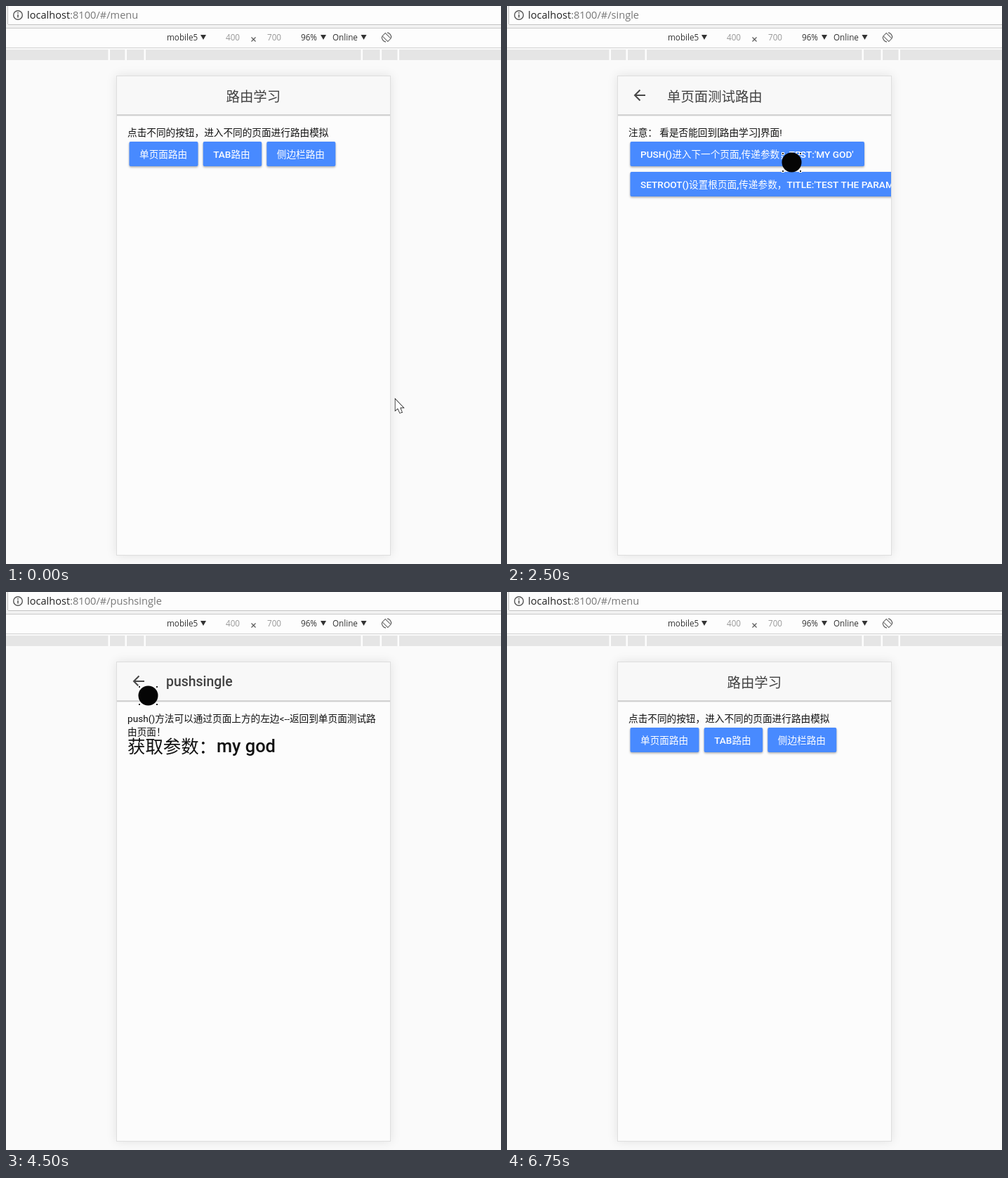
Recreate the animation shown at these times as an HTML page with a canvas. Size 705 px wide and 794 px high, loop 7.25 s.

```html
<!DOCTYPE html>
<html lang="zh-CN">
<head>
<meta charset="utf-8">
<title>路由学习</title>
<style>
html, body { margin: 0; width: 100%; height: 100%; overflow: hidden; background: #fafafa; }
canvas { display: block; }
</style>
</head>
<body>
<canvas id="stage" width="705" height="794"></canvas>
<script>
const W = 705, H = 794, STEP = 250, LOOP = 7250;
const stage = document.getElementById('stage').getContext('2d');
const APP = { x: 157, y: 99, w: 391, h: 683 };
const APP_FONT = 'Roboto, "Noto Sans CJK SC", "Noto Sans CJK", sans-serif';
const UI_FONT = '"Open Sans", "Noto Sans", sans-serif';
const BODY = 13.65, TITLE = 19.4, HEADING = 25.4;

// Touch position at each step, beginning at 250 ms
const touches = [
  [325, 380], [270, 292], [240, 245], [230, 230], [228, 227],
  [230, 232], [343, 493], [331, 390], [372, 268], [405, 222],
  [407, 225], [407, 225], [385, 262], [298, 298], [254, 267],
  [190, 152], [200, 147], [202, 147], [203, 149], [268, 415],
  [292, 300], [225, 180], [212, 149], [212, 147], [228, 163], [513, 441]
];

// Each scene: start time, address, page, and an optional page fading above it
const scenes = [
  { at: 0, path: 'menu', page: 'menu' },
  { at: 1500, path: 'menu', page: 'menu', over: 'single', alpha: 0.9, shift: 4 },
  { at: 1750, path: 'single', page: 'single' },
  { at: 3000, path: 'single', page: 'push', shift: 1 },
  { at: 3250, path: 'pushsingle', page: 'push' },
  { at: 4750, path: 'pushsingle', page: 'single', over: 'push', alpha: 0.35, shift: 25 },
  { at: 5000, path: 'single', page: 'single' },
  { at: 6000, path: 'single', page: 'menu', over: 'single', alpha: 0.35, shift: 25 },
  { at: 6250, path: 'menu', page: 'menu' }
];

function rect(c, x, y, w, h, color) {
  c.fillStyle = color;
  c.fillRect(x, y, w, h);
}

function text(c, str, x, y, size, color, weight = 400, family = APP_FONT) {
  c.font = `${weight} ${size}px ${family}`;
  c.fillStyle = color;
  c.fillText(str, x, y);
  return x + c.measureText(str).width;
}

function polyline(c, points, color, width, closed) {
  c.beginPath();
  points.forEach(([x, y]) => c.lineTo(x, y));
  if (closed) c.closePath();
  c.strokeStyle = color;
  c.lineWidth = width;
  c.stroke();
}

function button(c, label, x, y, w) {
  c.save();
  c.shadowColor = 'rgba(0,0,0,.32)';
  c.shadowBlur = 3;
  c.shadowOffsetY = 1.5;
  c.fillStyle = '#488aff';
  c.beginPath();
  c.roundRect(x, y, w, 35, 2);
  c.fill();
  c.restore();
  text(c, label, x + 14.5, y + 22.5, BODY, '#fff', 500);
}

function header(c) {
  rect(c, APP.x, APP.y, APP.w, 56, '#f8f8f8');
  rect(c, APP.x, 154, APP.w, 1, '#d6d6d6');
  rect(c, APP.x, 155, APP.w, 1, '#cfcfcf');
  rect(c, APP.x, 156, APP.w, 1, '#ececec');
}

function backArrow(c) {
  polyline(c, [[197, 127], [182.5, 127]], '#484848', 2);
  polyline(c, [[189.5, 119.5], [182, 127], [189.5, 134.5]], '#484848', 2);
}

const painters = {
  menu(c) {
    text(c, '路由学习', 313.5, 135.5, TITLE, '#424242');
    text(c, '点击不同的按钮，进入不同的页面进行路由模拟', 173, 185, BODY, '#111');
    button(c, '单页面路由', 175.5, 193, 98);
    button(c, 'TAB路由', 280.7, 193, 83.5);
    button(c, '侧边栏路由', 371.3, 193, 98);
  },
  single(c) {
    backArrow(c);
    text(c, '单页面测试路由', 228, 135.5, TITLE, '#424242');
    text(c, '注意： 看是否能回到[路由学习]界面!', 173, 185, BODY, '#111');
    button(c, "PUSH()进入下一个页面,传递参数，TEST:'MY GOD'", 175.5, 193, 333.5);
    button(c, "SETROOT()设置根页面,传递参数，TITLE:'TEST THE PARAMS'", 175.5, 236, 400);
  },
  push(c) {
    backArrow(c);
    text(c, 'pushsingle', 228, 134, TITLE, '#424242', 500);
    text(c, 'push()方法可以通过页面上方的左边<--返回到单页面测试路', 173, 185, BODY, '#111');
    text(c, '由页面！', 173, 203.5, BODY, '#111');
    const x = text(c, '获取参数：', 173, 228.5, HEADING, '#111', 300);
    text(c, 'my god', x, 228, HEADING, '#111', 500);
  }
};

function layer(paint) {
  const canvas = document.createElement('canvas');
  canvas.width = W;
  canvas.height = H;
  paint(canvas.getContext('2d'));
  return canvas;
}

const pages = {};
for (const name in painters) {
  pages[name] = layer(c => {
    rect(c, APP.x, APP.y, APP.w, APP.h, '#fcfcfc');
    header(c);
    painters[name](c);
  });
}

function triangle(c, x) {
  c.fillStyle = '#333';
  c.beginPath();
  c.moveTo(x, 41);
  c.lineTo(x + 8, 41);
  c.lineTo(x + 4, 48);
  c.fill();
}

function rotateIcon(c) {
  c.save();
  c.translate(542, 44.5);
  c.rotate(-Math.PI / 4);
  c.strokeStyle = '#666';
  c.lineWidth = 1;
  c.strokeRect(-3, -5.5, 6, 11);
  c.restore();
  for (const start of [-0.45, 0.55]) {
    c.beginPath();
    c.arc(542, 44.5, 6.7, start * Math.PI, (start + 0.5) * Math.PI);
    c.stroke();
  }
}

const chrome = layer(c => {
  rect(c, 0, 0, W, H, '#fafafa');
  rect(c, 0, 0, W, 31, '#f2f2f2');
  rect(c, 3, 0, W, 26, '#fdfdfd');
  rect(c, 2, 0, 1, 26, '#c4c4c4');
  rect(c, 3, 26, W, 1, '#c4c4c4');
  rect(c, 0, 31, W, 1, '#c9c9c9');
  rect(c, 0, 32, W, 27, '#fdfdfd');
  rect(c, 0, 59, W, 1, '#d2d2d2');
  rect(c, 0, 60, W, 2, '#fafafa');
  rect(c, 0, 62, W, 15, '#e5e5e5');
  for (const x of [145.5, 169.5, 196.5, 505.5, 532.5, 557.5]) rect(c, x, 62, 2.5, 15, '#fdfdfd');

  c.strokeStyle = '#555';
  c.lineWidth = 1.4;
  c.beginPath();
  c.arc(17, 13, 6.3, 0, 2 * Math.PI);
  c.stroke();
  rect(c, 16.2, 12, 1.6, 4.5, '#555');
  rect(c, 16.2, 9, 1.6, 1.7, '#555');

  const label = (str, x, color) => text(c, str, x, 49, 11.7, color, 400, UI_FONT);
  label('mobile5', 229, '#333');
  label('400', 313, '#999');
  label('700', 372, '#999');
  label('96%', 420, '#333');
  label('Online', 465, '#333');
  polyline(c, [[349.5, 44.5], [355.5, 50.5]], '#555', 1.1);
  polyline(c, [[355.5, 44.5], [349.5, 50.5]], '#555', 1.1);
  [277, 448, 505.5].forEach(x => triangle(c, x));
  rotateIcon(c);

  c.shadowColor = 'rgba(0,0,0,.1)';
  c.shadowBlur = 14;
  rect(c, APP.x, APP.y, APP.w, APP.h, '#fcfcfc');
});

function drawPage(name, shift = 0, alpha = 1) {
  stage.globalAlpha = alpha;
  stage.drawImage(pages[name], 0, shift);
  stage.globalAlpha = 1;
}

function drawTouch([x, y]) {
  stage.fillStyle = '#050505';
  stage.beginPath();
  stage.arc(x + 0.5, y + 0.5, 14, 0, 2 * Math.PI);
  stage.fill();
  for (const sx of [-1, 1]) {
    for (const sy of [-1, 1]) {
      const px = x + 0.5 + sx * 12.5, py = y + 0.5 + sy * 12.5;
      rect(stage, px - 2, py - 2, 4, 4, '#fff');
      rect(stage, px - 1, py - 1, 2, 2, '#222');
    }
  }
}

function drawPointer(x, y) {
  const outline = [[0, 0], [0, 16], [3.5, 13], [6.5, 19.5], [9.5, 18.5], [6.8, 12], [11.5, 12]];
  const points = outline.map(([dx, dy]) => [x + dx, y + dy]);
  polyline(stage, points, '#000', 1.4, true);
  stage.fillStyle = '#fff';
  stage.fill();
}

function draw(time) {
  const step = Math.floor((time % LOOP) / STEP);
  const scene = scenes.filter(s => s.at <= step * STEP).pop();

  stage.drawImage(chrome, 0, 0);
  const x = text(stage, 'localhost', 30, 18, 14.6, '#222', 400, UI_FONT);
  text(stage, ':8100/#/' + scene.path, x, 18, 14.6, '#777', 400, UI_FONT);

  stage.save();
  stage.beginPath();
  stage.rect(APP.x, APP.y, APP.w, APP.h);
  stage.clip();
  drawPage(scene.page, scene.over ? 0 : scene.shift);
  if (scene.over) drawPage(scene.over, scene.shift, scene.alpha);
  stage.restore();

  stage.strokeStyle = '#dedede';
  stage.lineWidth = 1;
  stage.strokeRect(APP.x + 0.5, APP.y + 0.5, APP.w - 1, APP.h - 1);

  if (step === 0) drawPointer(554.5, 559.5);
  else if (touches[step - 1]) drawTouch(touches[step - 1]);
}

let start;
function tick(now) {
  start ??= now;
  draw(Math.max(0, now - start));
  requestAnimationFrame(tick);
}
draw(0);
requestAnimationFrame(tick);
</script>
</body>
</html>
```
